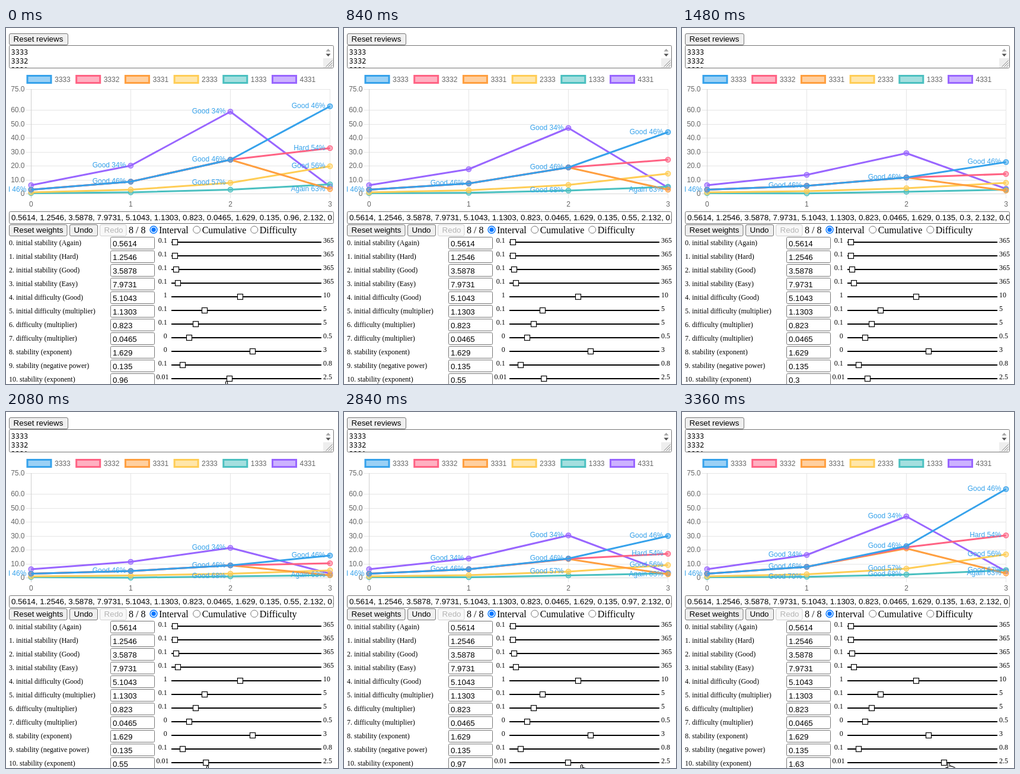
Write an HTML page that moves like this. It is 560 by 600 pixels and loops after 3.4 s.

```html
<!DOCTYPE html>
<html lang="en">
<head>
<meta charset="utf-8">
<title>Review interval chart</title>
<style>
  html, body { margin: 0; width: 100%; height: 100%; overflow: hidden; background: #fff; }
  svg { display: block; }
  text { white-space: pre; }
  .sans { font: 13.333px "Liberation Sans", Arial, sans-serif; }
  .chart { font: 12px "Liberation Sans", Arial, sans-serif; fill: #666; }
  .tag { font: 12px "Liberation Sans", Arial, sans-serif; fill: #36a2eb; text-anchor: end; }
  .serif { font: 16px "Liberation Serif", Times, serif; }
  .small { font: 12px "Liberation Serif", Times, serif; }
  .mono { font: 12px "Noto Sans Mono", monospace; }
  .end { text-anchor: end; }
  .mid { text-anchor: middle; }
</style>
</head>
<body>
<svg id="stage" width="560" height="600" viewBox="0 0 560 600">
  <clipPath id="areaClip"><rect x="6" y="30" width="546" height="37"/></clipPath>
  <clipPath id="fieldClip"><rect x="6" y="310" width="545.5" height="19"/></clipPath>
  <clipPath id="chartClip"><rect x="5" y="70" width="547" height="238"/></clipPath>
</svg>
<script>
const LOOP = 3400, STEP = 40;
const stage = document.getElementById('stage');

function add(tag, attrs, parent = stage) {
  const el = document.createElementNS('http://www.w3.org/2000/svg', tag);
  for (const k in attrs) el.setAttribute(k, attrs[k]);
  parent.appendChild(el);
  return el;
}
function text(x, y, str, cls, parent, extra) {
  const el = add('text', { x, y, class: cls, ...extra }, parent);
  el.textContent = str;
  return el;
}
function box(x, y, width, height, fill = '#fff', stroke = '#767676', rx = 2) {
  return add('rect', { x: x + .5, y: y + .5, width: width - 1, height: height - 1, fill, stroke, rx });
}
function line(x1, y1, x2, y2, stroke, width = 1, parent) {
  return add('line', { x1, y1, x2, y2, stroke, 'stroke-width': width }, parent);
}
function button(x, y, w, label, off) {
  box(x, y, w, 20, off ? '#f8f8f8' : '#efefef', off ? '#d0d0d0' : '#767676', 2.5);
  text(x + 7.6, y + 14.3, label, 'sans', stage, { fill: off ? '#b4b4b4' : '#000' });
}

// Review list
button(5, 9, 100, 'Reset reviews');
box(5, 29, 548, 39);
const area = add('g', { 'clip-path': 'url(#areaClip)' });
['3333', '3332', '3331'].forEach((s, i) => text(8.5, 45 + 15 * i, s, 'mono', area));
add('path', { d: 'M539.5 39.5 l4 -4.5 l4 4.5z', fill: '#a3a3a3' });
add('path', { d: 'M539.5 43.5 l4 4.5 l4 -4.5z', fill: '#505050' });
add('rect', { x: 535, y: 51, width: 17, height: 16, fill: '#eee' });
[3, 7, 11].forEach(d => line(550.5 - d, 65.5, 550.5, 65.5 - d, '#888'));

// Chart frame
const X = [42.3, 210.4, 378.5, 546.5];
const COLORS = ['#36a2eb', '#ff6384', '#ff9f40', '#ffcd56', '#4bc0c0', '#9966ff'];
const chart = add('g', { 'clip-path': 'url(#chartClip)' });
['3333', '3332', '3331', '2333', '1333', '4331'].forEach((name, i) => {
  const x = 36 + 82.7 * i;
  add('rect', { x, y: 80.5, width: 40, height: 12, fill: COLORS[i], 'fill-opacity': .5,
    stroke: COLORS[i], 'stroke-width': 3 }, chart);
  text(x + 46, 90.5, name, 'chart', chart);
});
[75, 60, 50, 40, 30, 20, 10, 0].forEach(v => {
  const y = Math.round(279 - v * 2.35);
  line(34, y + .5, 547, y + .5, v ? '#e5e5e5' : '#d8d8d8', 1, chart);
  text(31.5, y + 4, v ? v.toFixed(1) : '0', 'chart end', chart);
});
X.forEach((x, i) => {
  const gx = Math.floor(x) + .5;
  line(gx, 103, gx, 287, i ? '#e5e5e5' : '#cfcfcf', 1, chart);
  text(x, 301, i, 'chart mid', chart);
});

// Series, first one on top
const series = [];
for (let s = 5; s >= 0; s--) {
  const path = add('polyline', { fill: 'none', stroke: COLORS[s], 'stroke-width': 3, 'stroke-linejoin': 'round' }, chart);
  const dots = X.map(cx => add('circle', { cx, r: 4.2, fill: COLORS[s], 'fill-opacity': .5,
    stroke: COLORS[s], 'stroke-width': 1.3 }, chart));
  series[s] = { path, dots };
}

// Labels: series, point, text, phases in which it shows
const CUTS = [600, 1160, 1780, 2460, 3100];
const tags = [
  [0, 0, 'Good 46%', '012345'], [0, 1, 'Good 46%', '012345'],
  [0, 2, 'Good 46%', '012345'], [0, 3, 'Good 46%', '012345'],
  [1, 3, 'Hard 54%', '045'], [2, 3, 'Again 63%', '01345'],
  [3, 2, 'Good 57%', '045'], [3, 3, 'Good 56%', '045'],
  [4, 1, 'Good 70%', '5'], [4, 2, 'Good 68%', '135'], [4, 3, 'Good 67%', '5'],
  [5, 1, 'Good 34%', '045'], [5, 2, 'Good 34%', '01345']
].map(([s, p, str, phases]) => ({ s, p, phases, el: text(X[p] - 8, 0, str, 'tag', chart) }));

// Weights
box(5, 309, 548, 21);
const field = add('g', { 'clip-path': 'url(#fieldClip)' });
const weights = text(9, 324.3, '', 'sans', field);
button(5, 331, 98.5, 'Reset weights');
button(107, 331, 48, 'Undo');
button(158, 331, 45.5, 'Redo', true);
text(207, 346, '8 / 8', 'serif');
[[249, 'Interval'], [321.7, 'Cumulative'], [418.8, 'Difficulty']].forEach(([cx, name], i) => {
  add('circle', { cx, cy: 340, r: 6, fill: '#fff', stroke: i ? '#767676' : '#0075ff', 'stroke-width': i ? 1 : 1.4 });
  if (!i) add('circle', { cx, cy: 340, r: 3.8, fill: '#0075ff' });
  text(cx + 9, 346, name, 'serif');
});

// Parameter rows: name, value, min, max, thumb x
const rows = [
  ['initial stability (Again)', '0.5614', '0.1', 365, 285],
  ['initial stability (Hard)', '1.2546', '0.1', 365, 285],
  ['initial stability (Good)', '3.5878', '0.1', 365, 287],
  ['initial stability (Easy)', '7.9731', '0.1', 365, 290],
  ['initial difficulty (Good)', '5.1043', '1', 10, 395],
  ['initial difficulty (multiplier)', '1.1303', '0.1', 5, 335],
  ['difficulty (multiplier)', '0.823', '0.1', 5, 320],
  ['difficulty (multiplier)', '0.0465', '0', 0.5, 309],
  ['stability (exponent)', '1.629', '0', 3, 416],
  ['stability (negative power)', '0.135', '0.1', 0.8, 298],
  ['stability (exponent)', '0.96', '0.01', 2.5, 377]
];
let value, thumb;
rows.forEach(([name, val, min, max, x], i) => {
  const y = 23 * i;
  text(5, 366 + y, i + '. ' + name, 'small');
  box(176, 352 + y, 75, 21);
  value = text(180, 367.5 + y, val, 'sans');
  text(min.length > 3 ? 274.5 : 271.7, 362 + y, min, 'small end');
  text(535, 362 + y, max, 'small');
  line(279, 361 + y, 532, 361 + y, '#000', 2);
  thumb = add('rect', { x: x - 4.5, y: 356.5 + y, width: 9, height: 9, fill: '#fff', stroke: '#000', 'stroke-width': 1.2 });
});
const hand = add('path', {
  d: 'M-1.5 12 V1.5 Q0 -1 1.5 1.5 V6 Q3 4.5 4.5 6.5 Q6 5.5 7.5 7.5 Q9 6.5 10.5 9 V16 H1 L-5 9 Q-4.5 7 -1.5 9.5Z',
  fill: '#fff', stroke: '#000', 'stroke-width': 1.1
});

// time, 3333 (3 points), 3332 end, 3331 end, 2333 (3), 1333 (2), 4331 (3), spread at point 2
const CURVES = [
  [0, 259, 222, 132, 202.5, 271.5, 272.5, 261, 233, 272.5, 263.5, 232, 141, 267, 0],
  [360, 260, 226, 145, 208, 272, 273, 262, 237, 273, 265, 233.5, 149.5, 267.5, 0],
  [840, 262, 235, 175.5, 222, 272.5, 273.5, 264.5, 245.5, 274, 267.5, 238, 168.5, 269, 0],
  [1480, 266, 252, 226, 246, 274, 275, 270, 261, 276, 272.5, 247.5, 211, 271, 0],
  [1720, 267.4, 256.5, 238, 252.5, 274.6, 275.4, 272, 265.5, 276.7, 274.3, 251, 224, 271.8, 0],
  [2080, 268, 258.5, 242, 255, 275, 275.6, 272.5, 267, 277, 275, 252.5, 229, 272.3, 0],
  [2840, 265, 247, 209, 239, 273.5, 275, 269, 258, 275.5, 272, 247, 208, 271, .4],
  [3360, 261, 226, 130, 208, 272, 273.5, 264, 240, 274, 266.5, 241, 176, 268.5, 2]
];
// time, weight, pointer x, pointer y
const DRAG = [
  [0, .96, 372, 595], [360, .85, 353, 598.5], [840, .55, 332, 604], [1480, .3, 315, 606],
  [1740, .2, 312, 604], [2080, .55, 340, 596], [2840, .97, 401, 594], [3360, 1.63, 450, 591]
];

function at(table, t, smooth) {
  const last = table.length - 1;
  if (t >= table[last][0]) return table[last];
  const i = table.findIndex((r, k) => t < table[k + 1][0]);
  const a = table[i], b = table[i + 1], gap = b[0] - a[0], u = (t - a[0]) / gap;
  if (!smooth) return a.map((v, c) => v + (b[c] - v) * u);
  const slope = (k, c) => {
    const p = table[Math.max(k - 1, 0)], n = table[Math.min(k + 1, last)];
    return (n[c] - p[c]) / (n[0] - p[0]) * gap;
  };
  return a.map((v, c) => {
    const d = b[c] - v, m = slope(i, c), n = slope(i + 1, c);
    return v + u * (m + u * (3 * d - 2 * m - n + u * (m + n - 2 * d)));
  });
}

function draw(t) {
  const [, a1, a2, a3, hard, again, b1, b2, b3, c2, c3, p1, p2, p3, gap] = at(CURVES, t, true);
  const ys = [
    [272.5, a1, a2, a3],
    [272.5, a1, a2 + gap, hard],
    [272.5, a1, a2 + 2 * gap, again],
    [277, b1, b2, b3],
    [278.4, (278.4 + c2) / 2 + 1.5, c2, c3],
    [265, p1, p2, p3]
  ];
  series.forEach(({ path, dots }, s) => {
    path.setAttribute('points', X.map((x, p) => x + ',' + ys[s][p].toFixed(2)).join(' '));
    dots.forEach((dot, p) => dot.setAttribute('cy', ys[s][p]));
  });
  const phase = CUTS.filter(c => t >= c).length;
  tags.forEach(({ s, p, phases, el }) => {
    el.setAttribute('y', ys[s][p] + 3.3);
    el.setAttribute('visibility', phases.includes(phase) ? 'visible' : 'hidden');
  });

  const [, raw, hx, hy] = at(DRAG, t);
  const w = Math.round(raw * 100) / 100;
  value.textContent = w;
  thumb.setAttribute('x', 283.9 + 97 * w - 4.5);
  weights.textContent = [...rows.slice(0, 10).map(r => r[1]), w, '2.132', '0.0641'].join(', ');
  hand.setAttribute('transform', `translate(${hx} ${hy})`);
}

const start = performance.now();
function tick() {
  const t = (performance.now() - start) % LOOP;
  draw(Math.floor(t / STEP) * STEP);
  requestAnimationFrame(tick);
}
draw(0);
requestAnimationFrame(tick);
</script>
</body>
</html>
```
